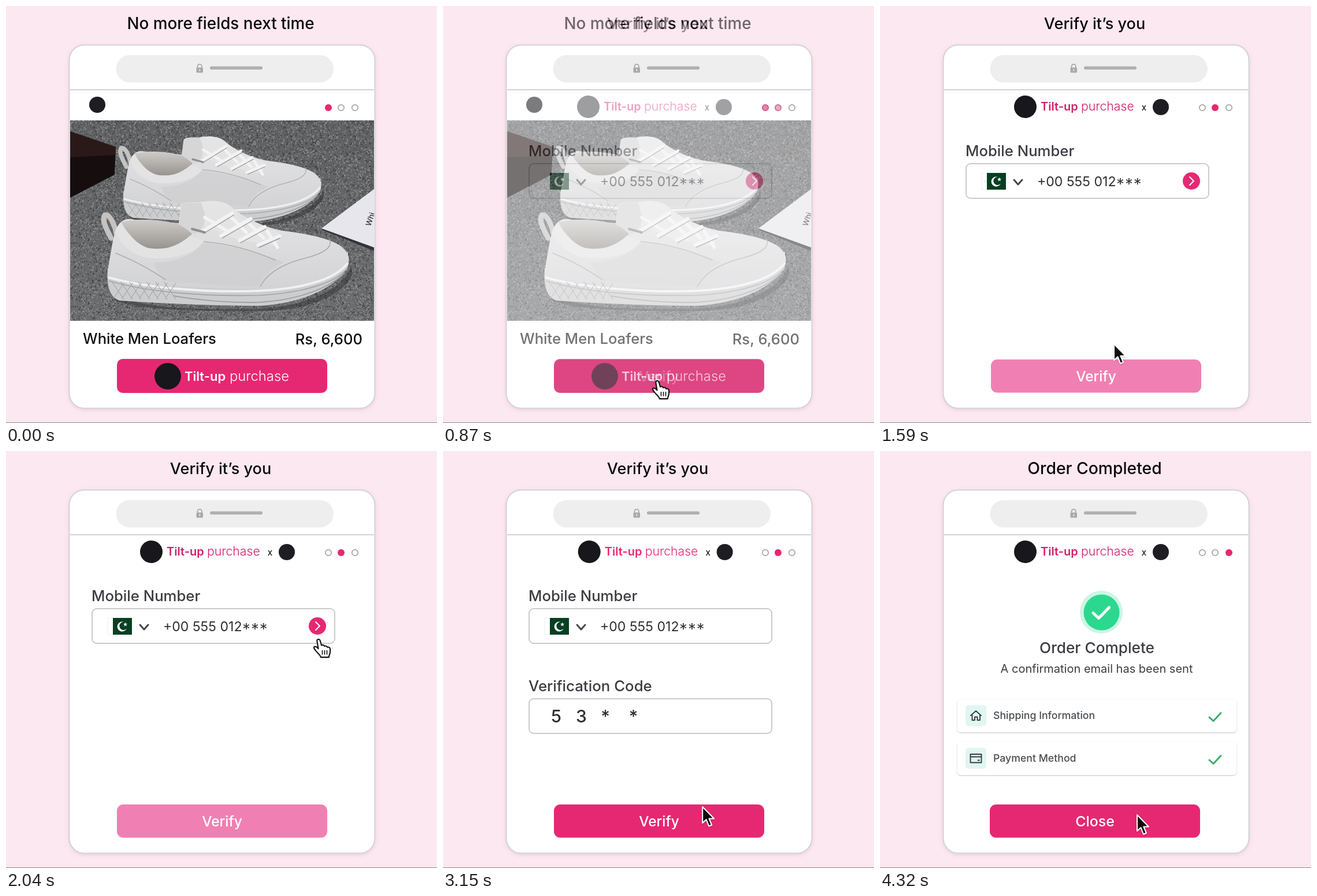
Animation of 746 by 722 pixels, one loop 4350 ms. Source, as an HTML page:

```html
<!DOCTYPE html>
<html lang="en">
<head>
<meta charset="utf-8">
<title>Checkout flow</title>
<style>
  html, body { margin: 0; width: 100%; height: 100%; overflow: hidden; background: #fce8f0; }
  svg { display: block; width: 746px; height: 722px; }
  text { font-family: Inter, "Open Sans", sans-serif; font-weight: 500; }
  .bold { font-weight: 600; }
  .book { font-weight: 400; }
  .light { font-weight: 300; }
</style>
</head>
<body>
<svg id="stage" viewBox="0 0 746 722" xmlns="http://www.w3.org/2000/svg"></svg>
<script>
const LOOP = 4350;
const PINK = '#e62872', DARK = '#3c3d42', INK = '#1e1e22';

const text = (x, y, size, str, fill = DARK, extra = '') =>
  `<text x="${x}" y="${y}" font-size="${size}" fill="${fill}" ${extra}>${str}</text>`;
const mid = 'text-anchor="middle"';
const box = (x, y, w, h, r, fill, extra = '') =>
  `<rect x="${x}" y="${y}" width="${w}" height="${h}" rx="${r}" fill="${fill}" ${extra}/>`;
const disc = (x, y, r, fill, extra = '') =>
  `<circle cx="${x}" cy="${y}" r="${r}" fill="${fill}" ${extra}/>`;
const line = (d, color, w, extra = '') =>
  `<path d="${d}" fill="none" stroke="${color}" stroke-width="${w}" stroke-linecap="round" stroke-linejoin="round" ${extra}/>`;
const shape = (d, fill, extra = '') => `<path d="${d}" fill="${fill}" ${extra}/>`;

// Seeded flecks for the carpet
let seed = 7;
const rnd = () => (seed = (seed * 16807) % 2147483647) / 2147483647;
function flecks() {
  let out = '';
  for (let i = 0; i < 900; i++) {
    const x = rnd() * 110, y = rnd() * 110, a = rnd() * Math.PI;
    const tone = ['#38393b', '#98999b', '#47484a', '#88898b'][i % 4];
    out += `<path d="M${x.toFixed(1)} ${y.toFixed(1)}l${(2.6 * Math.cos(a)).toFixed(1)} ${(2.6 * Math.sin(a)).toFixed(1)}" stroke="${tone}" stroke-width="1.3"/>`;
  }
  return out;
}

// Diamond pattern on the heel of the sole
function heelGrid() {
  let d = '';
  for (let x = 184; x < 280; x += 15) d += `M${x} 478l20 30M${x + 20} 480l-18 26`;
  return line(d, '#a6a7a9', 1.2);
}

const shoe =
  shape('M184 500C240 524 330 526 440 524C530 518 586 486 597 452L600 462C586 502 520 528 440 528C320 530 220 524 190 510Z', '#2f3032', 'opacity=".5"') +
  line('M192 398C188 378 180 360 171 362C165 372 176 390 182 402', '#c4c3c2', 9) +
  shape('M176 454C174 482 178 503 196 510C260 514 340 519 440 519C510 515 574 488 592 450L592 426L400 452Z', '#cccdcf') +
  shape('M176 458C180 436 184 408 189 390C196 372 206 366 222 370L299 376L303 345C306 340 318 339 334 340C352 336 374 336 388 346C410 366 444 382 478 389C520 394 560 402 580 416C594 428 597 440 590 450C570 474 520 486 440 490C340 490 230 484 176 466Z', 'url(#leather)') +
  shape('M200 374C230 366 270 370 302 378L322 394C306 418 270 424 240 418C220 410 208 392 200 374Z', 'url(#lining)') +
  shape('M198 376C212 392 224 414 250 420C276 424 300 414 318 398L346 408C322 434 270 442 236 434C206 424 192 400 190 388Z', '#e3e3e4') +
  shape('M340 410C320 436 280 446 256 444C262 462 270 474 284 478L436 486C446 466 462 452 482 444C440 428 390 414 340 410Z', '#cfcfd1', 'opacity=".75"') +
  shape('M299 378L304 345C308 340 322 340 338 341L348 374L328 396Z', '#d6d6d7') +
  shape('M346 354C380 352 420 378 474 392L470 416L400 404L342 380Z', '#e4e4e5') +
  line('M342 408C390 412 430 424 466 440M440 486C452 462 480 446 520 436C550 428 566 418 560 404M190 428C220 440 250 456 276 474', '#adadaf', 1.6) +
  line('M178 470C240 488 350 497 440 493C520 489 570 472 591 446', '#f0f0f0', 4) +
  line('M178 476C250 497 350 503 440 501C520 496 572 478 591 454', '#a2a3a5', 1.6) +
  line('M290 502C350 512 400 514 440 513C510 508 560 488 586 462', '#9fa0a2', 1.8) +
  heelGrid() +
  line('M340 390L392 358M372 398L424 368M404 406L448 382M436 414L474 398M344 366L384 390M386 362L416 392M420 376L446 402M452 390L470 418', '#f3f3f3', 5.5) +
  line('M342 394L394 362M374 402L426 372M406 410L450 386M438 418L474 402', '#98989a', 1.4) +
  line('M322 386l22 6', '#8f8f91', 4);

const photo = `<g clip-path="url(#frame)">` +
  box(111, 198, 526, 347, 0, 'url(#floor)') +
  box(111, 198, 526, 347, 0, 'url(#carpet)') +
  shape('M111 217L190 244L188 292L111 332Z', '#150d0e') +
  shape('M111 217L190 244L189 258L111 262Z', '#2b191a') +
  shape('M548 388L637 424V418L546 385Z', '#333437') +
  shape('M546 385L637 317V418Z', '#e6e6ec') +
  text(631, 382, 13, 'Whi', '#333', 'transform="rotate(-72 631 382)"') +
  `<g transform="matrix(.82 0 0 .817 59 -50)">${shoe}</g>${shoe}</g>`;

const ramp = (id, a, b) =>
  `<linearGradient id="${id}" x1="0" y1="0" x2="0" y2="1"><stop offset="0" stop-color="${a}"/><stop offset="1" stop-color="${b}"/></linearGradient>`;

const defs = `<defs>
  <clipPath id="frame"><rect x="111" y="198" width="526" height="347"/></clipPath>
  ${ramp('floor', '#606163', '#6c6d6f')}${ramp('leather', '#e6e6e7', '#d3d3d5')}${ramp('lining', '#cfccc9', '#97938f')}
  <pattern id="carpet" width="110" height="110" patternUnits="userSpaceOnUse">${flecks()}</pattern>
  <filter id="soft" x="-10%" y="-10%" width="120%" height="120%"><feDropShadow dx="0" dy="1" stdDeviation="1.2" flood-color="#000" flood-opacity=".25"/></filter>
  <filter id="glow" x="-5%" y="-5%" width="110%" height="110%"><feDropShadow dx="0" dy="2" stdDeviation="3" flood-color="#a06080" flood-opacity=".18"/></filter>
  <g id="base">` +
  box(0, 0, 746, 722, 0, '#fce8f0') +
  box(109.5, 67.5, 529, 629, 26, '#fff', 'stroke="#d3d3d4" stroke-width="2" filter="url(#glow)"') +
  box(190.5, 85, 376.5, 47.5, 23.7, '#eeeeee') +
  line('M331.5 107V104.5a3.7 3.7 0 0 1 7.4 0V107', '#a9a9a9', 1.8) +
  box(329.5, 106.5, 11.5, 9, 1.5, '#a9a9a9') +
  box(334.5, 109, 1.6, 4, .8, '#eee') +
  box(353, 104.5, 91, 5.5, 2.5, '#b0b0b2') +
  box(111, 144, 526, 2, 0, '#d3d3d4') +
  box(0, 721, 746, 1, 0, '#8f8388') +
  `</g></defs>`;

const dots = on => [558, 580, 604].map((x, i) => i === on
  ? disc(x, 176, 6, PINK)
  : disc(x, 176, 5.2, '#fff', 'stroke="#a9a9ab" stroke-width="1.8"')).join('');

const header = (dx, color) => `<g transform="translate(${dx} 0)">` +
  disc(251.5, 174.5, 19.5, '#17171c') +
  text(278, 181, 20, 'Tilt-up', color, 'class="bold"') +
  text(348, 181, 21.2, 'purchase', color, 'class="light"') +
  text(457, 181, 15, 'x', INK, mid) +
  disc(486, 175, 14, INK) + `</g>`;

const button = (x, fill, label, size) =>
  box(x, 612, 364, 57.5, 11, fill) +
  text(x + 182, 650, size, label, '#fff', mid);

const field = y => box(149, y, 420, 60, 8, '#fff', 'stroke="#cbcbcd" stroke-width="2"');

const phone =
  text(148, 260, 25.7, 'Mobile Number') + field(273) +
  box(176, 289, 10, 29, 0, '#fff', 'stroke="#eee" stroke-width="1"') +
  box(185, 289, 33, 29, 0, '#063f22') +
  shape('M204 296A8.5 8.5 0 1 0 209 307A7 7 0 1 1 204 296Z', '#fff') +
  shape('M206.500 296.5l1 2.5 2.7.1-2.1 1.7.7 2.6-2.3-1.5-2.2 1.5.7-2.6-2.1-1.7 2.7-.1Z', '#fff') +
  line('M232 301l7 8 7-8', '#45474c', 3) +
  text(272, 312, 23.1, '+00 555 012***', '#2e2f33', 'class="book"');

const title = (str, size) => text(371.5, 40, size, str, '#0c0a0b', mid);

const row = (y, label, icon) =>
  box(134, y, 483, 57, 6, '#fff', 'filter="url(#soft)"') +
  box(148, y + 10, 36, 36, 5, '#e0f6f1') +
  `<g transform="translate(166 ${y + 28})">${icon}</g>` +
  text(196, y + 34, 17.7, label, '#4a4c50') +
  line(`M570 ${y + 31}l7 6.5 13-14`, '#3aae68', 3);

const house = line('M-9 0L0-8L9 0M-6.5-1V8H-2V2.5H2.5V8H7V-1', '#3a3d42', 1.9);
const card = line('M-9.5-7H9.5V7.5H-9.5ZM-9.5-2.5H9.5M3.5 3.5H6', '#3a3d42', 1.9);

const pages = [
  title('No more fields next time', 27.8) +
    disc(158, 171, 14, INK) + dots(0) + photo +
    text(133, 585, 25.6, 'White Men Loafers', '#0f0f11') +
    text(617, 586, 25.6, 'Rs, 6,600', '#0f0f11', 'text-anchor="end"') +
    box(192, 611, 364, 59, 10, PINK, 'id="buy"') +
    disc(280, 641, 23, '#17171c') +
    text(309, 649, 22, 'Tilt-up', '#fff', 'class="bold"') +
    text(387, 649, 23.8, 'purchase', '#fff', 'class="light"'),

  title('Verify it’s you', 27.1) + header(0, '#d0206a') + dots(1) + phone +
    disc(539, 303, 15, PINK) + line('M536 296l7 7-7 7', '#fff', 2) +
    button(192, '#f080b3', 'Verify', 24.4),

  title('Verify it’s you', 27.1) + header(1.7, PINK) + dots(1) + phone +
    text(148, 416, 25.8, 'Verification Code') + field(429) +
    [['5', 196], ['3', 239.5], ['*', 281], ['*', 329.5]]
      .map(([c, x]) => text(x, 470, 30, c, '#2e2f33', mid)).join('') +
    button(192, PINK, 'Verify', 24.4),

  title('Order Completed', 28.3) + header(0, '#d0206a') + dots(2) +
    disc(383, 279, 37, '#cdf5e4') + disc(383.5, 279.5, 31, '#2cd88f') +
    line('M369 280.5l9.5 9 18-18.5', '#fff', 5) +
    text(375.5, 350, 26.2, 'Order Complete', DARK, mid) +
    text(375, 384, 20, 'A confirmation email has been sent', DARK, mid + ' class="book"') +
    row(430, 'Shipping Information', house) + row(504, 'Payment Method', card) +
    button(190, PINK, 'Close', 24.9)
];

const arrow = shape('M0 0V28L6.5 22L11 33.5L16 31.5L11.3 20.5H20Z', '#0a0a0a',
  'stroke="#fff" stroke-width="2" stroke-linejoin="round"');
const hand =
  shape('M-2.6 2.2C-3.4-1.2 1.6-2.4 2.6 1L5 9.5C7 8.2 9.6 8.8 10 11C12 9.8 14.5 10.6 15 12.8C17.5 11.8 19.8 13.2 20 15.5V21C20 24 18 26 17.8 30H4C3.6 27-2 22.5-5 18.5C-7.5 15-9 13.5-7.5 12C-5.5 10.4-2.6 12.6-.4 15.5Z',
    '#fff', 'stroke="#111" stroke-width="2" stroke-linejoin="round"') +
  line('M6.5 18.5v6.5M10.5 18.5v6.5M14.5 18.5v6.5', '#111', 1.6);

const stage = document.getElementById('stage');
stage.innerHTML = defs +
  pages.map((p, i) => `<g id="page${i}"><use href="#base"/>${p}</g>`).join('') +
  `<g id="cursor" filter="url(#soft)"><g id="arrow">${arrow}</g><g id="hand">${hand}</g></g>`;

const $ = id => document.getElementById(id);
const layers = pages.map((_, i) => $('page' + i));
const [cursor, arrowEl, handEl, buy] = ['cursor', 'arrow', 'hand', 'buy'].map($);

const clamp = v => Math.max(0, Math.min(1, v));
const ease = v => { v = clamp(v); return v * v * (3 - 2 * v); };
const mix = (a, b, p) => a + (b - a) * p;

// Start of each page's dissolve, and cursor stops as [time, x, y]
const FADES = [0, 690, 2270, 3420], FADE = 410;
const PATH = [
  [30, 410, 745], [480, 371, 650], [1410, 371, 650], [2040, 541, 327],
  [2160, 542, 306], [2600, 542, 306], [3230, 445, 630], [LOOP, 445, 630]
];

function pointer(t) {
  if (t <= PATH[0][0]) return PATH[0].slice(1);
  const i = PATH.findIndex(k => t <= k[0]);
  const a = PATH[i - 1], b = PATH[i];
  const p = ease((t - a[0]) / (b[0] - a[0]));
  return [mix(a[1], b[1], p), mix(a[2], b[2], p)];
}

function draw(t) {
  const shown = FADES.map((s, i) => i ? ease((t - s) / FADE) : 1);
  layers.forEach((el, i) => {
    const covered = shown[i + 1] === 1;
    el.setAttribute('display', shown[i] > 0 && !covered ? 'inline' : 'none');
    el.setAttribute('opacity', shown[i].toFixed(3));
  });

  const hover = clamp((t - 420) / 150);
  const rgb = [[230, 208], [40, 30], [114, 98]].map(([a, b]) => Math.round(mix(a, b, hover)));
  buy.setAttribute('fill', `rgb(${rgb})`);

  const [x, y] = pointer(t);
  const pointing = (t < 1440 && y < 668) || (t > 1980 && t < 2290);
  cursor.setAttribute('transform', `translate(${x.toFixed(2)} ${y.toFixed(2)})`);
  arrowEl.setAttribute('display', pointing ? 'none' : 'inline');
  handEl.setAttribute('display', pointing ? 'inline' : 'none');
}

const start = performance.now();
function tick() {
  draw((performance.now() - start) % LOOP);
  requestAnimationFrame(tick);
}
draw(0);
requestAnimationFrame(tick);
</script>
</body>
</html>
```
